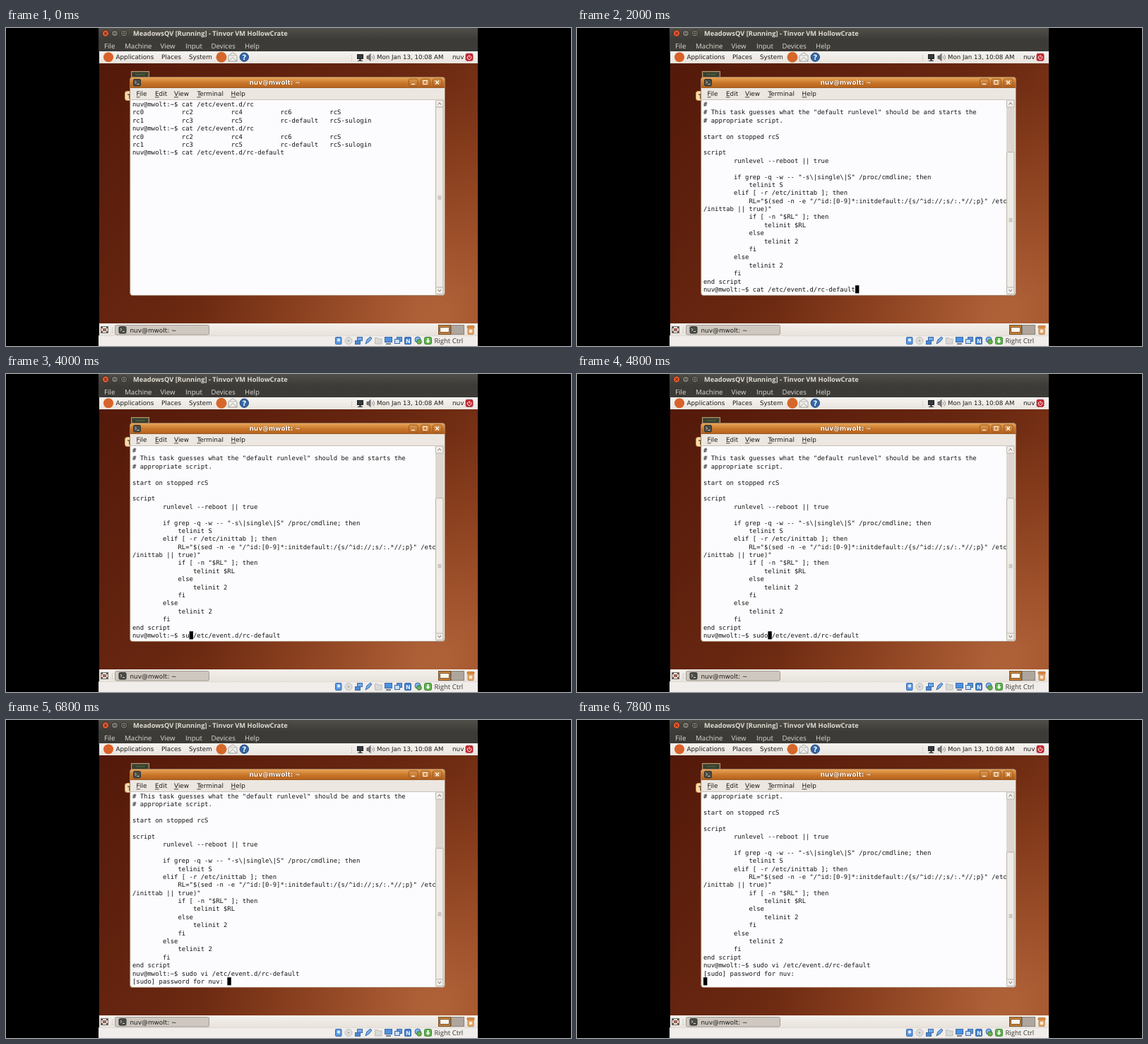
An HTML page with a canvas that plays this animation: 800x450 px, repeating every 8000 ms.

```html
<!DOCTYPE html>
<html lang="en">
<head>
<meta charset="utf-8">
<title>Terminal session</title>
<style>
html, body { margin: 0; width: 100%; height: 100%; overflow: hidden; background: #000; }
canvas { display: block; width: 800px; height: 450px; }
</style>
</head>
<body>
<canvas id="stage" width="800" height="450"></canvas>
<script>
const ctx = document.getElementById('stage').getContext('2d');
const LOOP = 8000, ROWS = 24, ROW = 11.39, LEFT = 179;
const SIZE = 8.93, CELL = SIZE * .602;
const SANS = '"DejaVu Sans", sans-serif';
const MONO = SIZE + 'px "DejaVu Sans Mono", monospace';
const HOST = 'nuv@mwolt', PROMPT = HOST + ':~$ ';
const PATH = ' /etc/event.d/rc-default';

// ---- drawing helpers ----
function box(x, y, w, h, fill, line) {
  ctx.fillStyle = fill;
  ctx.fillRect(x, y, w, h);
  if (line) {
    ctx.strokeStyle = line;
    ctx.lineWidth = 1;
    ctx.strokeRect(x + .5, y + .5, w - 1, h - 1);
  }
}

function round(x, y, w, h, r, fill, line) {
  ctx.beginPath();
  ctx.roundRect(x, y, w, h, r);
  ctx.fillStyle = fill;
  ctx.fill();
  if (line) { ctx.strokeStyle = line; ctx.lineWidth = 1; ctx.stroke(); }
}

function disc(x, y, r, fill, line) {
  ctx.beginPath();
  ctx.arc(x, y, r, 0, Math.PI * 2);
  ctx.fillStyle = fill;
  ctx.fill();
  if (line) { ctx.strokeStyle = line; ctx.lineWidth = 1; ctx.stroke(); }
}

function path(points, color, width = 1, fill) {
  ctx.beginPath();
  points.forEach(([x, y]) => ctx.lineTo(x, y));
  if (fill) { ctx.closePath(); ctx.fillStyle = fill; ctx.fill(); }
  if (color) { ctx.strokeStyle = color; ctx.lineWidth = width; ctx.stroke(); }
}

function text(s, x, y, font, color) {
  ctx.font = font;
  ctx.fillStyle = color;
  ctx.fillText(s, x, y);
}

function shade(y0, y1, ...colors) {
  const g = ctx.createLinearGradient(0, y0, 0, y1);
  colors.forEach((c, i) => g.addColorStop(i / (colors.length - 1), c));
  return g;
}

// ---- scenery ----
function hostFrame() {
  box(0, 0, 800, 450, '#000');
  box(131, 0, 537, 34, '#3c3b37');
  box(131, 0, 537, 16, shade(0, 16, '#504e48', '#3d3c38'));
  disc(141, 7.6, 4.8, '#e2592f', '#2b2a27');
  path([[139, 5.6], [143, 9.6]], '#4a2015');
  path([[143, 5.6], [139, 9.6]], '#4a2015');
  for (const x of [154, 167]) disc(x, 7.6, 4.6, '#77756c', '#2b2a27');
  path([[152, 7.6], [156, 7.6]], '#33322e');
  ctx.strokeStyle = '#33322e';
  ctx.strokeRect(165, 6.1, 4, 3);
  text('MeadowsQV [Running] - Tinvor VM HollowCrate', 180, 11,
    'bold 9.3px "Open Sans", sans-serif', '#dfdbd2');
  const menu = [['File', 139], ['Machine', 168], ['View', 218.5], ['Input', 254], ['Devices', 290.5], ['Help', 338]];
  for (const [s, x] of menu) text(s, x, 28.6, '9.7px "Open Sans", sans-serif', '#dfdbd2');
}

function desktop() {
  let g = ctx.createLinearGradient(132, 50, 560, 470);
  g.addColorStop(0, '#54190a');
  g.addColorStop(.5, '#672610');
  g.addColorStop(1, '#92441f');
  box(132, 50, 536, 368, g);
  g = ctx.createRadialGradient(600, 400, 20, 600, 400, 320);
  g.addColorStop(0, 'rgba(190,112,68,.65)');
  g.addColorStop(1, 'rgba(160,80,40,0)');
  box(132, 50, 536, 368, g);
  box(177, 61, 26, 12, '#4b4934', '#b59f78');
  box(180, 64, 20, 8, '#313d2c');
  path([[183, 66], [197, 66]], '#66704f');
  round(168.5, 89.5, 14, 13, 3, '#f6dcae', '#d39a55');
  text('T', 172, 99.5, 'bold 9px ' + SANS, '#5b3413');
}

function topPanel() {
  box(132, 33, 536, 17, shade(33, 50, '#f6f3f0', '#e9e4de'));
  disc(145, 41.2, 7, '#d9622a');
  for (const [s, x] of [['Applications', 155.5], ['Places', 220], ['System', 259]])
    text(s, x, 44.2, '8.8px ' + SANS, '#1c1a18');
  disc(305, 41.2, 7.5, '#d5682a');
  path([[315, 39], [321, 34.8], [327, 39], [327, 47], [315, 47]], '#a3a39e', 1, '#f0efeb');
  path([[315, 47], [321, 41.5], [327, 47]], '#a3a39e');
  path([[317, 39], [325, 39]], '#b8b7b2');
  disc(337.3, 41.2, 6.2, '#3466a5', '#234a7c');
  text('?', 334.6, 45, 'bold 10px ' + SANS, '#fff');
  for (const y of [39, 42, 45]) box(489, y, 1, 1, '#a8a19a');
  box(497, 37, 9, 7, '#343a3d', '#1d2021');
  box(500, 44, 3, 2, '#555');
  box(498, 46, 7, 1, '#333');
  path([[511, 39.5], [513, 39.5], [516, 36.5], [516, 46.5], [513, 43.5], [511, 43.5]], '#444', .7, '#777');
  ctx.strokeStyle = '#666';
  for (const r of [2.5, 5]) {
    ctx.beginPath();
    ctx.arc(516.5, 41.5, r, -.9, .9);
    ctx.stroke();
  }
  text('Mon Jan 13, 10:08 AM', 525, 44.2, '8.65px ' + SANS, '#1c1a18');
  text('nuv', 632, 44.2, '8.8px ' + SANS, '#1c1a18');
  round(651, 36.3, 10, 10, 2, '#c8202a', '#a83a40');
  ctx.beginPath();
  ctx.arc(656, 41.7, 2.8, -.9, Math.PI + .9);
  ctx.strokeStyle = '#fff';
  ctx.stroke();
  path([[656, 38], [656, 41.7]], '#fff');
}

function terminalIcon(x, y) {
  round(x, y, 10, 9.5, 1.5, '#4a4c48', '#33342f');
  path([[x + 2, y + 2.5], [x + 4, y + 4.3], [x + 2, y + 6]], '#d6d6d0');
  path([[x + 5, y + 7], [x + 8, y + 7]], '#d6d6d0');
}

function bottomPanel() {
  box(132, 418, 536, 17, shade(418, 435, '#f3f0ec', '#e8e3dc'));
  box(134, 422, 11, 10, '#e6e1da', '#77716b');
  box(137, 425, 5, 4, '#a4645a');
  for (const [x, y] of [[135, 423], [142, 423], [135, 429], [142, 429]]) box(x, y, 2, 2, '#55504c');
  for (const y of [424, 427, 430]) box(150, y, 1, 1, '#a8a19a');
  round(154.5, 420.5, 133, 13.5, 2, '#cfc8c0', '#a39b92');
  terminalIcon(160, 422.5);
  text(HOST + ': ~', 175.5, 430.6, '8.9px ' + SANS, '#1c1a18');
  box(612, 420, 18, 14, '#c98236', '#6e4a2a');
  box(614, 423, 14, 8, '#fbf7ee', '#7c5a38');
  box(630, 420, 19, 14, '#aea69d', '#8a827a');
  round(653, 421.5, 10, 3, 1, '#e08b43', '#b9743c');
  round(654, 424.5, 8, 9, 1, '#e9a76c', '#c0813f');
  disc(658, 429, 2.3, '#f7e8d7');
}

function statusBar() {
  box(131, 435, 537, 15, '#f0edea');
  box(131, 435, 537, 1, '#dfdad5');
  const blue = '#3f7cc6', edge = '#3a69a8';
  round(466.5, 437.5, 8.5, 10, 1, '#5b9ae0', edge);
  disc(471, 441.5, 2.2, '#dcecff');
  disc(485, 442.5, 5, '#dddddb', '#bdbdba');
  disc(485, 442.5, 1.3, '#aaa');
  box(497, 437, 8, 6, '#72a9e8', edge);
  box(494, 442, 8, 6, '#4d8ad2', edge);
  path([[509, 447], [511, 441], [516, 437], [518, 439], [514, 444]], edge, 1, '#77aee8');
  path([[522.5, 438.5], [526, 438.5], [527, 440], [532, 440], [532, 447], [522.5, 447]], '#bdbdb9', 1, '#d9d9d5');
  box(536, 437, 11, 8, '#4e91df', edge);
  box(538, 446, 7, 2, '#6b7c92');
  box(553, 437, 8, 7, '#5b9ae0', edge);
  box(550, 440, 8, 7, '#c7def8', edge);
  round(564.5, 437.5, 9, 10, 1, blue, edge);
  text('N', 566, 445.5, 'bold 8px ' + SANS, '#e6f1ff');
  disc(583, 441, 4, '#81b5ea', edge);
  disc(585, 444, 3.3, '#6bb054', '#3f7a31');
  round(592.5, 437.5, 10, 10, 2, '#62b250', '#3d8033');
  path([[597.5, 439], [597.5, 443]], '#fff', 2);
  path([[594.5, 442.5], [600.5, 442.5], [597.5, 446]], null, 1, '#fff');
  text('Right Ctrl', 606.5, 446, '9.5px "Open Sans", sans-serif', '#3c3b37');
}

function windowFrame() {
  round(175.5, 69.5, 446, 309, 4, '#ece7e1', '#a07a5e');
  round(176, 70, 445, 15, [4, 4, 0, 0], shade(70, 85, '#e7a557', '#c9772b', '#b4601b'));
  box(176, 84, 445, 1, '#9a5a26');
  terminalIcon(180.5, 72.5);
  text(HOST + ': ~', 345.6, 80.4, 'bold 8.9px ' + SANS, '#6c3508');
  text(HOST + ': ~', 344.8, 79.7, 'bold 8.9px ' + SANS, '#fff');
  for (const x of [570.5, 587.5, 604.5])
    round(x, 72, 12.5, 10.5, 2, shade(72, 83, '#dc9a50', '#b9661f'), '#9c5a26');
  path([[574, 79.5], [579, 79.5]], '#fff', 1.2);
  ctx.strokeStyle = '#fff';
  ctx.lineWidth = 1;
  ctx.strokeRect(591, 74.5, 5, 5);
  path([[608.3, 74.7], [613, 79.5]], '#fff', 1.3);
  path([[613, 74.7], [608.3, 79.5]], '#fff', 1.3);
  const menu = [['File', 184.6], ['Edit', 211], ['View', 238], ['Terminal', 270.4], ['Help', 318.6]];
  for (const [s, x] of menu) {
    text(s, x, 96.3, '8.9px ' + SANS, '#1c1a18');
    box(x, 97.5, ctx.measureText(s[0]).width, .8, '#1c1a18');
  }
  box(177, 101, 431, 276.5, '#fcfbfd');
  box(177, 101, 431, 1, '#c9c2ba');
}

// ---- session ----
const listing = [
  'rc0          rc2          rc4          rc6          rcS',
  'rc1          rc3          rc5          rc-default   rcS-sulogin'
];
const history = [
  PROMPT + 'cat /etc/event.d/rc', ...listing,
  PROMPT + 'cat /etc/event.d/rc', ...listing,
  PROMPT + 'cat' + PATH
];
const script = `# rc-default - runlevel compatibility
#
# This task guesses what the "default runlevel" should be and starts the
# appropriate script.

start on stopped rcS

script
        runlevel --reboot || true

        if grep -q -w -- "-s\\|single\\|S" /proc/cmdline; then
            telinit S
        elif [ -r /etc/inittab ]; then
            RL="$(sed -n -e "/^id:[0-9]*:initdefault:/{s/^id://;s/:.*//;p}" /etc
/inittab || true)"
            if [ -n "$RL" ]; then
                telinit $RL
            else
                telinit 2
            fi
        else
            telinit 2
        fi
end script`.split('\n');
const shown = [...history, ...script];
const done = [...shown, PROMPT + 'sudo vi' + PATH];

// Edits of the recalled command: time, first word(s), cursor column
const edits = [
  [400, null, 0], [1800, 'cat', 27], [2400, 'cat', 0], [3000, 'at', 0],
  [3200, 't', 0], [3400, '', 0], [3800, 's', 1], [4000, 'su', 2],
  [4400, 'sud', 3], [4600, 'sudo', 4], [5000, 'sudo ', 5],
  [5200, 'sudo v', 6], [5600, 'sudo vi', 7]
];

function session(t) {
  if (t < 400) return { lines: history, col: history[6].length, since: -600 };
  if (t >= 7800) return { lines: [...done, '[sudo] password for nuv:', ''], col: 0, since: 7800 };
  if (t >= 6800) return { lines: [...done, '[sudo] password for nuv: '], col: 25, since: 6800 };
  const [since, word, col] = edits.findLast(e => e[0] <= t);
  const command = word === null ? '' : word + PATH;
  return { lines: [...shown, PROMPT + command], col: PROMPT.length + col, since };
}

function terminal(t) {
  const { lines, col, since } = session(t);
  const view = lines.slice(-ROWS);
  const top = i => 102.2 + i * ROW;
  view.forEach((s, i) => text(s, LEFT, top(i) + 8.8, MONO, '#161616'));
  if ((t - since) % 1200 < 600) {
    const row = view.length - 1, x = LEFT + col * CELL;
    box(x, top(row), CELL, 11.2, '#000');
    text(view[row][col] || '', x, top(row) + 8.8, MONO, '#fff');
  }
  scrollbar(lines.length);
}

function scrollbar(count) {
  box(608, 101, 12, 276.5, '#ddd7d0');
  const h = 255 * Math.min(1, ROWS / count), y = 367 - h;
  for (const [by, dir] of [[102, -1], [366.5, 1]]) {
    round(608.5, by, 10.5, 10, 1, '#f1eee9', '#bdb5ac');
    path([[611.5, by + 5 - dir * 1.5], [613.8, by + 5 + dir * 1.5], [616, by + 5 - dir * 1.5]], '#77716b');
  }
  round(608.5, y, 10.5, h, 1, '#efebe6', '#bab2a9');
  for (const d of [-2, 0, 2]) box(611.5, y + h / 2 + d, 5, 1, '#b0a89f');
}

function draw(t) {
  ctx.textRendering = 'geometricPrecision';
  hostFrame();
  desktop();
  topPanel();
  bottomPanel();
  statusBar();
  windowFrame();
  terminal(t);
}

let start;
function tick(now) {
  start ??= now;
  draw((now - start) % LOOP);
  requestAnimationFrame(tick);
}
requestAnimationFrame(tick);
</script>
</body>
</html>
```
